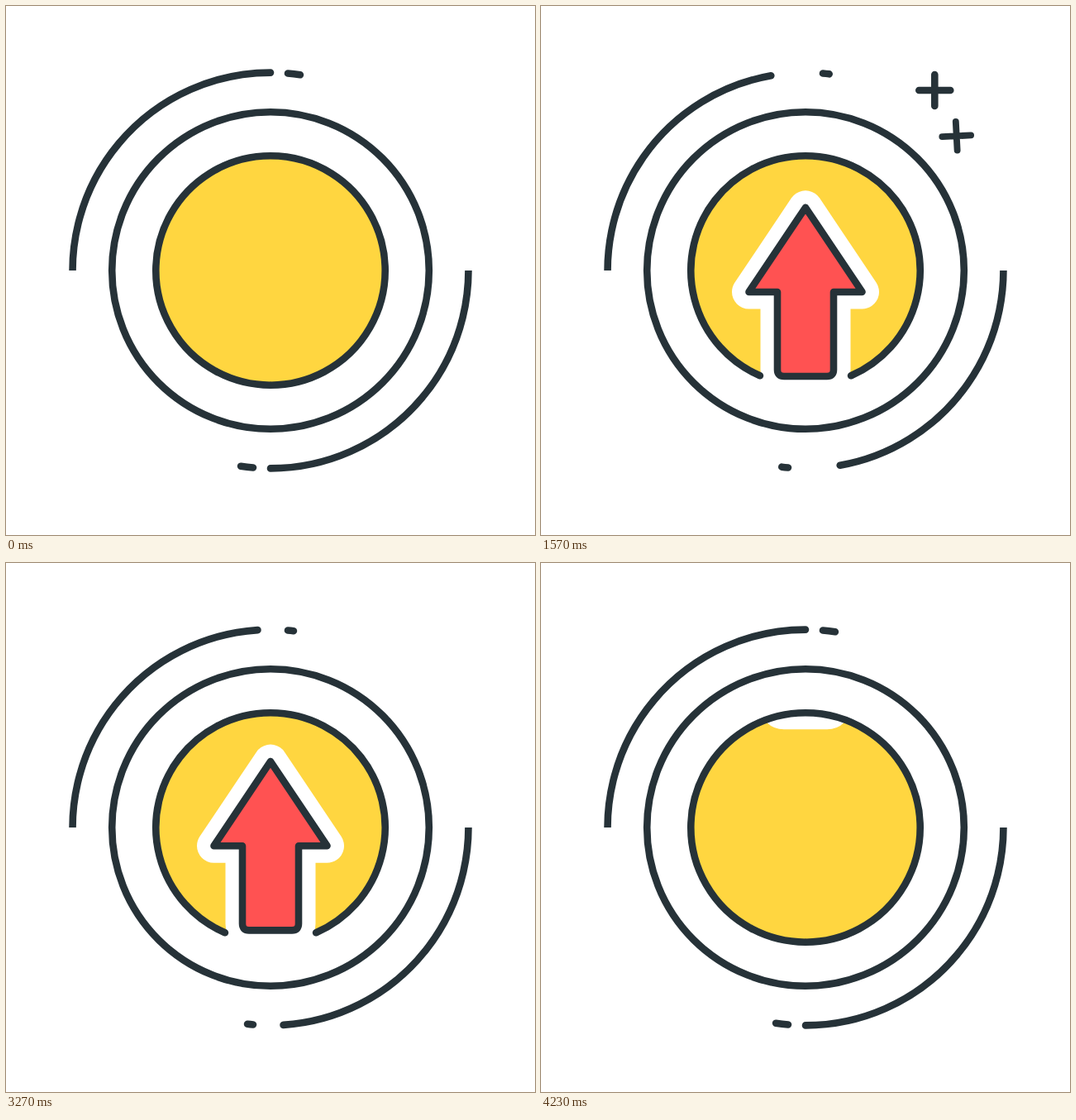
Recreate the animation shown at these times as an HTML page. Size 640 px wide and 640 px high, loop 4.26 s.

```html
<!DOCTYPE html>
<html lang="en">
<head>
<meta charset="utf-8">
<title>Rising arrow</title>
<style>
  html, body { margin: 0; width: 100%; height: 100%; overflow: hidden; background: #fff; }
  svg { display: block; width: 100%; height: 100%; }
  .line { fill: none; stroke: #263238; stroke-width: 8.6; stroke-linecap: round; stroke-linejoin: round; }
</style>
</head>
<body>
<svg viewBox="0 0 640 640">
  <defs>
    <clipPath id="upper"><rect width="640" height="320"/></clipPath>
    <clipPath id="disc"><circle cx="320" cy="320" r="140.8"/></clipPath>
    <path id="arrowShape" d="M0 0L68.5 102.2H34V196.3Q34 204.3 26 204.3H-26Q-34 204.3 -34 196.3V102.2H-68.5Z"/>
  </defs>

  <g class="line">
    <path id="plusA" d="M-19 0H19M0 -19V19"/>
    <path id="plusB" d="M-19 0H19M0 -19V19"/>
  </g>

  <g id="orbit" class="line" clip-path="url(#upper)">
    <path id="sweep"/>
    <path id="dash"/>
  </g>
  <use href="#orbit" transform="rotate(180 320 320)"/>

  <circle class="line" cx="320" cy="320" r="191.8" style="fill:#fff"/>
  <circle cx="320" cy="320" r="138.7" fill="#ffd640"/>
  <g clip-path="url(#disc)">
    <g id="arrow">
      <use href="#arrowShape" fill="#fff" stroke="#fff" stroke-width="41" stroke-linejoin="round"/>
      <use href="#arrowShape" class="line" style="fill:#ff5252"/>
    </g>
  </g>
  <path id="rim" class="line"/>
</svg>

<script>
const LOOP = 4260, CENTER = 320, ORBIT = 239.4, RIM = 138.7;
const el = id => document.getElementById(id);
const clamp = x => Math.min(1, Math.max(0, x));
const progress = (t, from, to) => clamp((t - from) / (to - from));
const smooth = p => p * p * (3 - 2 * p);

// Eased value through [time, value] keys
function track(t, keys) {
  const i = Math.max(1, keys.findIndex(k => t <= k[0]));
  const [t0, v0] = keys[i - 1], [t1, v1] = keys[i];
  return v0 + (v1 - v0) * smooth(progress(t, t0, t1));
}

// Circular arc, angles in degrees clockwise from the top
function arc(r, from, to) {
  const point = deg => {
    const a = deg * Math.PI / 180;
    return (CENTER + r * Math.sin(a)).toFixed(3) + ' ' + (CENTER - r * Math.cos(a)).toFixed(3);
  };
  return `M${point(from)}A${r} ${r} 0 ${to - from > 180 ? 1 : 0} 1 ${point(to)}`;
}

function arrowTip(t) {
  if (t < 800) return 228 + 254 * (1 - t / 800) ** 1.8;
  if (t < 2720) return track(t, [[800, 228], [2130, 253.5], [2720, 253.5]]);
  return 253.5 - 276.5 * ((t - 2720) / 1510) ** 3;
}

// Each plus spins out from the centre along a bowed path
const pluses = [
  { id: 'plusA', x: 156.3, y: -218, bow: 80, start: 0, end: 1563, fade: [1920, 2080] },
  { id: 'plusB', x: 221.3, y: -167.3, bow: 185, start: 150, end: 2328, fade: [2655, 2805] }
];

function drawPlus(t, { id, x, y, bow, start, end, fade }) {
  const rest = (1 - progress(t, start, end)) ** 2, e = 1 - rest;
  const side = bow * e * rest / Math.hypot(x, y);
  const px = CENTER + x * e + y * side, py = CENTER + y * e - x * side;
  el(id).setAttribute('transform',
    `translate(${px} ${py}) rotate(${720 * rest}) scale(${1 - 0.7 * rest})`);
  el(id).setAttribute('opacity', 1 - progress(t, ...fade));
}

function draw(t) {
  const trim = track(t, [[0, 0], [1800, 10.5], [LOOP, 0]]);
  const dash = track(t, [[0, 3.6], [1070, 1.5], [1900, 2.05], [3100, 1.55], [LOOP, 3.6]]);
  const gap = track(t, [[0, 0], [503, 23.4], [3495, 23.4], [3995, 0], [LOOP, 0]]);
  el('sweep').setAttribute('d', arc(ORBIT, -100, -trim));
  el('dash').setAttribute('d', arc(ORBIT, 5.03, 5.03 + dash));
  el('rim').setAttribute('d', arc(RIM, -180 + Math.max(gap, 0.1), 180 - Math.max(gap, 0.1)));
  el('arrow').setAttribute('transform', `translate(${CENTER} ${arrowTip(t)})`);
  pluses.forEach(plus => drawPlus(t, plus));
}

function tick() {
  draw(performance.now() % LOOP);
  requestAnimationFrame(tick);
}
tick();
</script>
</body>
</html>
```
